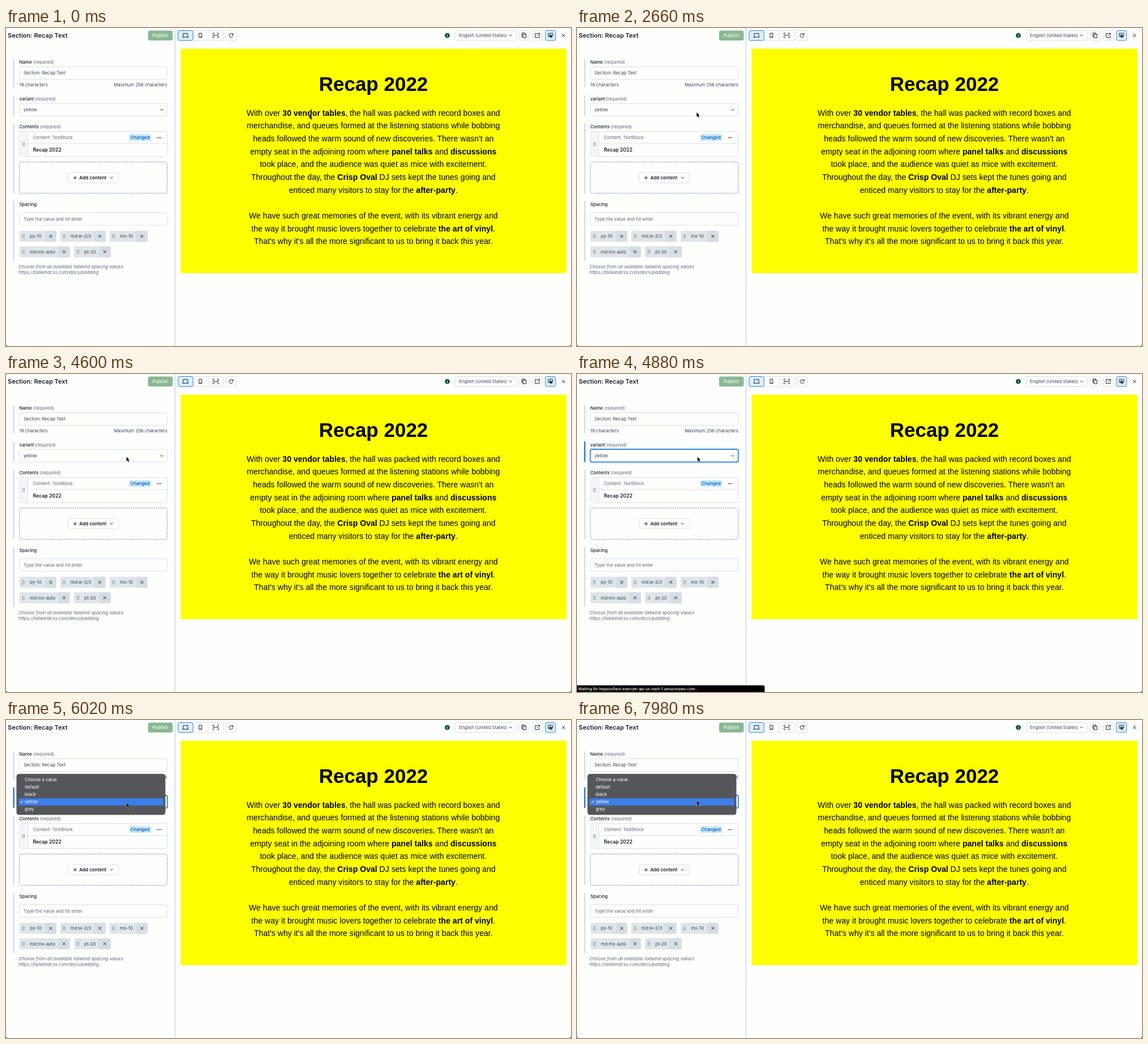
Animation, 998 px wide and 561 px high, one loop 8000 ms. Source, as an HTML page:

```html
<!DOCTYPE html>
<html lang="en">
<head>
<meta charset="utf-8">
<title>Section editor</title>
<style>
  html, body { margin: 0; width: 100%; height: 100%; overflow: hidden; background: #fefefd; }
  svg { display: block; width: 100vw; height: 100vh; }
  text { font: 7.9px Inter, sans-serif; fill: #17212e; }
  .medium { font-weight: 500; }
  .semi { font-weight: 600; }
  .muted { fill: #5a657c; }
  .page { font: 14.08px "Liberation Sans", Arial, sans-serif; fill: #000; text-anchor: middle; }
  .page.title { font-size: 35px; font-weight: 700; }
  .page tspan { font-weight: 700; }
  .icon { fill: none; stroke: #17212e; stroke-width: 1; stroke-linejoin: round; stroke-linecap: round; }
</style>
</head>
<body>
<svg id="stage" viewBox="0 0 998 561" xmlns="http://www.w3.org/2000/svg"></svg>
<script>
const LOOP = 8000, FOCUS_AT = 4880, MENU_AT = 6000;
const LINE = '#cfd9e0', BLUE = '#0a63d1', PALE_BLUE = '#dcf0fd', WHITE = '#fefefd';

const box = (x, y, x2, y2, fill = WHITE, stroke = LINE, r = 3, extra = '') =>
  `<rect x="${x}" y="${y}" width="${x2 - x}" height="${y2 - y}" rx="${r}" fill="${fill}" stroke="${stroke}" stroke-width=".8" ${extra}/>`;
// y is the middle of the line of text
const text = (x, y, str, cls = '', style = '') =>
  `<text x="${x}" y="${y + 2.8}" class="${cls}" style="${style}">${str}</text>`;
const icon = (x, y, d, style = '') =>
  `<path class="icon" transform="translate(${x} ${y})" d="${d}" style="${style}"/>`;
const group = (id, content) => `<g id="${id}">${content}</g>`;

const chevron = (x, y, s = 2.3) => icon(x, y, `M${-s} ${-s / 2}L0 ${s / 2}L${s} ${-s / 2}`);
const cross = (x, y, s = 2.3) => icon(x, y, `M${-s} ${-s}L${s} ${s}M${s} ${-s}L${-s} ${s}`);
const grip = (x, y) => icon(x, y, 'M-1.3 -2.5h0M1.3 -2.5h0M-1.3 0h0M1.3 0h0M-1.3 2.5h0M1.3 2.5h0', 'stroke-width:1.3;stroke:#36435a');
const sideBar = (y, y2, color = LINE) => box(12.7, y, 14.7, y2, color, 'none', 0);
const label = (y, name, requiredX) =>
  text(23.5, y, name, 'medium') + (requiredX ? text(requiredX, y, '(required)', 'muted') : '');

function tag(x, y, x2, split, name) {
  return box(x, y, x2, y + 19.5, '#dfe5e8', 'none', 2.5)
    + box(split, y, x2, y + 19.5, '#d5dee3', 'none', 2)
    + grip(x + 7, y + 9.7)
    + text(x + 18.3, y + 9.7, name, '', 'fill:#36435a')
    + cross((split + x2) / 2, y + 9.7);
}

function sidebar() {
  return text(3, 14, 'Section: Recap Text', 'semi', 'font-size:11px')
    + box(251, 4.5, 294.5, 22, '#8ab893', 'none')
    + text(272.5, 13.3, 'Publish', 'medium', 'fill:#f4faf5;text-anchor:middle')

    + sideBar(55, 105) + label(60, 'Name', 48)
    + box(23.7, 68.3, 284.7, 90.7) + text(31, 79.4, 'Section: Recap Text', '', 'fill:#36435a')
    + text(23.5, 100.3, '19 characters', '', 'fill:#36435a')
    + text(285, 100.3, 'Maximum 256 characters', '', 'fill:#36435a;text-anchor:end')

    + sideBar(119, 155) + label(124.7, 'variant', 51)
    + box(23.7, 133, 284.7, 155.2)

    + sideBar(169, 291.5) + label(174.2, 'Contents', 60)
    + box(23.7, 182.6, 284.7, 226.8)
    + box(24.1, 183, 38.5, 226.4, '#f3f6f8', 'none', 2.5)
    + icon(0, 0, 'M38.5 183V226.5M38.5 204H284.5', `stroke:${LINE};stroke-width:.8`)
    + grip(31, 205) + text(47.5, 193.3, 'Content: TextBlock', 'muted')
    + box(217.3, 187, 256.5, 199.3, '#c9eaff', 'none')
    + text(236.8, 193.3, 'Changed', 'medium', 'fill:#0050b4;text-anchor:middle')
    + icon(270.4, 193.4, 'M-2.8 0h0M0 0h0M2.8 0h0', 'stroke-width:1.7')
    + text(47.5, 215.5, 'Recap 2022', 'semi', 'font-size:8.7px')

    + box(23.7, 236.4, 284.7, 291.6, 'none', '#59688c', 3, 'stroke-dasharray="2 1.4"')
    + box(109.8, 255, 198.8, 273.2)
    + icon(122, 264.2, 'M-2.8 0H2.8M0 -2.8V2.8') + text(129.5, 264.2, 'Add content', 'semi', 'font-size:8.1px')
    + chevron(186.3, 264.2)

    + sideBar(305, 411) + label(311, 'Spacing')
    + box(23.7, 325.8, 284.7, 348)
    + text(31, 337, 'Type the value and hit enter', 'muted')
    + tag(23.7, 357.7, 89, 69, 'py-10') + tag(95.8, 357.7, 176, 155.5, 'md:w-2/3') + tag(183, 357.7, 250, 230, 'mx-10')
    + tag(23.7, 385, 113, 92, 'md:mx-auto') + tag(120, 385, 185, 164, 'pt-20')
    + text(22, 421.5, 'Choose from all available tailwind spacing values', 'muted', 'font-style:italic')
    + text(22, 431.6, 'https://tailwindcss.com/docs/padding', 'muted', 'font-style:italic')
    + box(297, 0, 298, 561, '#eef1f3', 'none', 0) + box(298, 0, 299.3, 561, '#d5dce2', 'none', 0);
}

function toolbar() {
  return box(304, 4.5, 384, 22) + icon(0, 0, 'M357 5V21.6', `stroke:${LINE};stroke-width:.8`)
    + box(304, 4.5, 330.3, 22, PALE_BLUE, BLUE)
    + icon(317, 13, 'M-4 2.3V-3.3H4V2.3M-5.4 3.2H5.4')
    + icon(343.6, 13, 'M-2.3 -3.8H2.3V3.8H-2.3ZM-.5 2.3H.5')
    + icon(370.5, 13, 'M-5 -1.8V-4H-2.5M2.5 -4H5V-1.8M5 1.8V4H2.5M-2.5 4H-5V1.8M-4 0H4M-2.6 -1.4L-4 0L-2.6 1.4M2.6 -1.4L4 0L2.6 1.4', 'stroke-width:.9')
    + box(388.3, 4.5, 407, 22)
    + icon(397.6, 13.2, 'M3.2 1A3.4 3.4 0 1 1 2.5 -2.3L3.4 -1.3M3.5 -3.6V-1.2H1.1')
    + '<circle cx="779.5" cy="13.2" r="4.4" fill="#0b5a37"/>'
    + icon(779.5, 13.2, 'M0 -2.1h0M0 -.1V2', 'stroke:#fff')
    + box(793.5, 4.5, 901, 22) + text(800, 13.3, 'English (United States)', '', 'fill:#36435a') + chevron(891.3, 13.2, 2)
    + box(906, 4.5, 924, 22) + icon(915, 13, 'M-1.6 -2H3.7V4.2H-1.6ZM-1.6 2H-3.7V-4.2H1.6V-2')
    + box(929.5, 4.5, 947.5, 22) + icon(938.5, 13, 'M-.5 -3.5H-3.7V3.8H3.6V.8M1.2 -3.7H3.9V-1M3.7 -3.5L-.3 .5')
    + box(952.8, 4.5, 970.8, 22, PALE_BLUE, BLUE)
    + icon(961.8, 13, 'M-1 2H-4V-3.7H4V1') + icon(961.8, 13, 'M-1.3 -1.3L3.5 .6L1.5 1.5L3 3.8L2 4.4L.7 2.2L-.7 3.5Z', 'fill:#17212e;stroke-width:.7')
    + cross(984.7, 13.2, 2.5);
}

function preview() {
  const bold = s => `<tspan>${s}</tspan>`;
  const lines = [
    `With over ${bold('30 vendor tables')}, the hall was packed with record boxes and`,
    'merchandise, and queues formed at the listening stations while bobbing',
    "heads followed the warm sound of new discoveries. There wasn't an",
    `empty seat in the adjoining room where ${bold('panel talks')} and ${bold('discussions')}`,
    'took place, and the audience was quiet as mice with excitement.',
    `Throughout the day, the ${bold('Crisp Oval')} DJ sets kept the tunes going and`,
    `enticed many visitors to stay for the ${bold('after-party')}.`,
    '',
    'We have such great memories of the event, with its vibrant energy and',
    `the way it brought music lovers together to celebrate ${bold('the art of vinyl')}.`,
    "That's why it's all the more significant to us to bring it back this year.",
  ];
  return box(308.5, 36.5, 990, 432.5, '#ff0', 'none', 0)
    + text(649, 108.4, 'Recap 2022', 'page title')
    + lines.map((line, i) => text(648.8, 151.8 + i * 22.67, line, 'page')).join('');
}

const focusRing = sideBar(119, 155, BLUE)
  + box(23.7, 133, 284.7, 155.2, 'none', '#a5d3ff', 3, 'style="stroke-width:3.4"')
  + box(23.7, 133, 284.7, 155.2, WHITE, '#1672e0', 3, 'style="stroke-width:1.3"');

const statusBar = '<path d="M0 549.2H328.5Q331.5 549.2 331.5 552.2V561H0Z"/>'
  + text(2, 555, 'Waiting for lmppvs0wzi.execute-api.us-east-1.amazonaws.com...', 'medium', 'fill:#fff;font-size:6.8px');

const menu = box(18.5, 96, 281.5, 168, '#000', 'none', 4, 'opacity=".15"')
  + box(19, 95.5, 281, 166.8, '#55565a', '#4a4b4e', 4)
  + box(22, 138, 278, 151, '#3d7de6', 'none', 2.5)
  + icon(27.5, 144.6, 'M-2 .2L-.6 2L2 -2.2', 'stroke:#fff')
  + ['Choose a value', 'default', 'black', 'yellow', 'grey'].map((option, i) =>
      text(33, 105.3 + i * 13.05, option, '', 'fill:#fff;font-size:7.8px')).join('');

const arrow = '<path d="M0 0V7.6L1.7 6L3 9L4.5 8.4L3.2 5.5H5.4Z" fill="#000" stroke="#fff" stroke-width=".7" paint-order="stroke"/>';
const windowCorners = '<path d="M0 558V561H3Q0 561 0 558ZM998 558V561H995Q998 561 998 558Z"/>';

const stage = document.getElementById('stage');
stage.innerHTML = sidebar() + toolbar() + preview()
  + group('focus', focusRing)
  + text(31, 144.5, 'yellow', '', 'fill:#36435a') + chevron(275, 144.5)
  + windowCorners
  + group('status', statusBar) + group('menu', menu) + group('cursor', arrow);

const [focus, status, menuBox, cursor] = ['focus', 'status', 'menu', 'cursor'].map(id => document.getElementById(id));

// time, x, y of the pointer tip
const route = [
  [0, 536, 152.7], [640, 536, 152.7], [1260, 226.5, 179], [1810, 226.5, 179],
  [2650, 211.3, 149], [3200, 212.8, 146.3],
  [6900, 212.8, 146.3], [7900, 211.7, 142.5], [LOOP, 211.7, 142.5],
];

function pointerAt(t) {
  const i = route.findIndex(stop => stop[0] > t);
  const [t0, x0, y0] = route[i - 1], [t1, x1, y1] = route[i];
  const p = (t - t0) / (t1 - t0), eased = p * p * (3 - 2 * p);
  return [x0 + (x1 - x0) * eased, y0 + (y1 - y0) * eased];
}

const show = (element, visible) => element.setAttribute('visibility', visible ? 'visible' : 'hidden');

function draw() {
  const t = performance.now() % LOOP;
  show(focus, t >= FOCUS_AT);
  show(status, t >= FOCUS_AT && t < MENU_AT);
  show(menuBox, t >= MENU_AT);
  cursor.setAttribute('transform', `translate(${pointerAt(t).join(' ')})`);
  requestAnimationFrame(draw);
}
draw();
</script>
</body>
</html>
```
